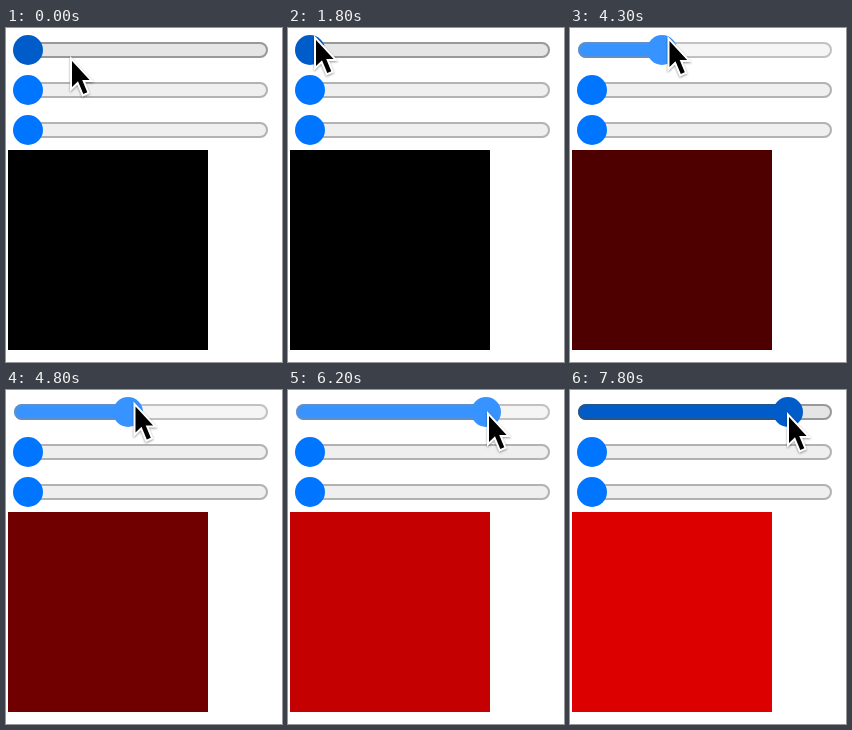
An HTML page that plays this animation: 276x334 px, repeating every 8 s.

```html
<!DOCTYPE html>
<html lang="en">
<head>
<meta charset="utf-8">
<title>Color sliders</title>
<style>
  html, body { margin: 0; width: 100%; height: 100%; overflow: hidden; background: #fff; }
  svg { display: block; width: 100%; height: 100%; }
  #cursor { filter: drop-shadow(0 1.5px 1.2px rgba(0, 0, 0, .4)); }
</style>
</head>
<body>
<svg viewBox="0 0 276 334" xmlns="http://www.w3.org/2000/svg">
  <defs>
    <clipPath id="pill"><rect x="8" y="14" width="254" height="16" rx="8"/></clipPath>
  </defs>
  <g id="sliders"></g>
  <rect id="swatch" x="2" y="122" width="200" height="200"/>
  <g id="cursor">
    <path d="M0 1V27L6 21.3L11.3 34L15.3 32.3L10.2 20H17.6Z"
      stroke="#fff" stroke-width="4" paint-order="stroke"/>
  </g>
</svg>
<script>
const LOOP = 8000, STEP = 100, MIN_X = 22;
const THEMES = {
  idle:  { accent: '#0075ff', track: '#efefef', border: '#767676' },
  hover: { accent: '#005cc8', track: '#e5e5e5', border: '#4f4f4f' },
  press: { accent: '#3793ff', track: '#f5f5f5', border: '#8d8d8d' }
};

// Key poses: approach, rest, then a drag that slows down at the end
const POSES = [
  { t: 1000, thumb: MIN_X, x: 66, y: 32 },
  { t: 1800, thumb: MIN_X, x: 28, y: 11 },
  { t: 3100, thumb: MIN_X, x: 28, y: 11 },
  { t: 4300, thumb: 92, x: 99.5, y: 12 },
  { t: 5300, thumb: 152, x: 159.5, y: 19 },
  { t: 6200, thumb: 198, x: 201, y: 25 },
  { t: 7500, thumb: 218, x: 219, y: 26 }
];

const $ = id => document.getElementById(id);

function poseAt(t) {
  const next = POSES.findIndex(p => p.t > t);
  if (next === 0) return POSES[0];
  if (next < 0) return POSES[POSES.length - 1];
  const a = POSES[next - 1], b = POSES[next];
  const u = (t - a.t) / (b.t - a.t);
  const mix = key => a[key] + (b[key] - a[key]) * u;
  return { thumb: mix('thumb'), x: mix('x'), y: mix('y') };
}

function make(tag, attrs, parent) {
  const el = document.createElementNS('http://www.w3.org/2000/svg', tag);
  for (const k in attrs) el.setAttribute(k, attrs[k]);
  return parent.appendChild(el);
}

function makeSlider(y) {
  const g = make('g', { transform: `translate(0 ${y})` }, $('sliders'));
  const bar = { x: 8, y: 14, height: 16, 'clip-path': 'url(#pill)' };
  const track = make('rect', { ...bar, width: 254 }, g);
  const fill = make('rect', bar, g);
  const border = make('rect', {
    x: 9, y: 15, width: 252, height: 14, rx: 7,
    fill: 'none', 'stroke-width': 2, 'stroke-opacity': .5
  }, g);
  const thumb = make('circle', { cy: 22, r: 15 }, g);
  return (x, theme) => {
    track.setAttribute('fill', theme.track);
    fill.setAttribute('width', x - 8);
    fill.setAttribute('fill', theme.accent);
    border.setAttribute('stroke', theme.border);
    thumb.setAttribute('cx', x);
    thumb.setAttribute('fill', theme.accent);
  };
}

const [red, green, blue] = [0, 40, 80].map(makeSlider);
green(MIN_X, THEMES.idle);
blue(MIN_X, THEMES.idle);

function render(ms) {
  const t = Math.floor((ms % LOOP) / STEP) * STEP;
  const { thumb, x, y } = poseAt(t);
  const pressed = t >= 2600 && t < 7800;
  red(thumb, pressed ? THEMES.press : THEMES.hover);
  $('swatch').setAttribute('fill', `rgb(${Math.round((thumb - MIN_X) * 1.12)},0,0)`);
  $('cursor').setAttribute('transform', `translate(${x} ${y})`);
}

const start = performance.now();
function tick() {
  render(performance.now() - start);
  requestAnimationFrame(tick);
}
tick();
</script>
</body>
</html>
```
